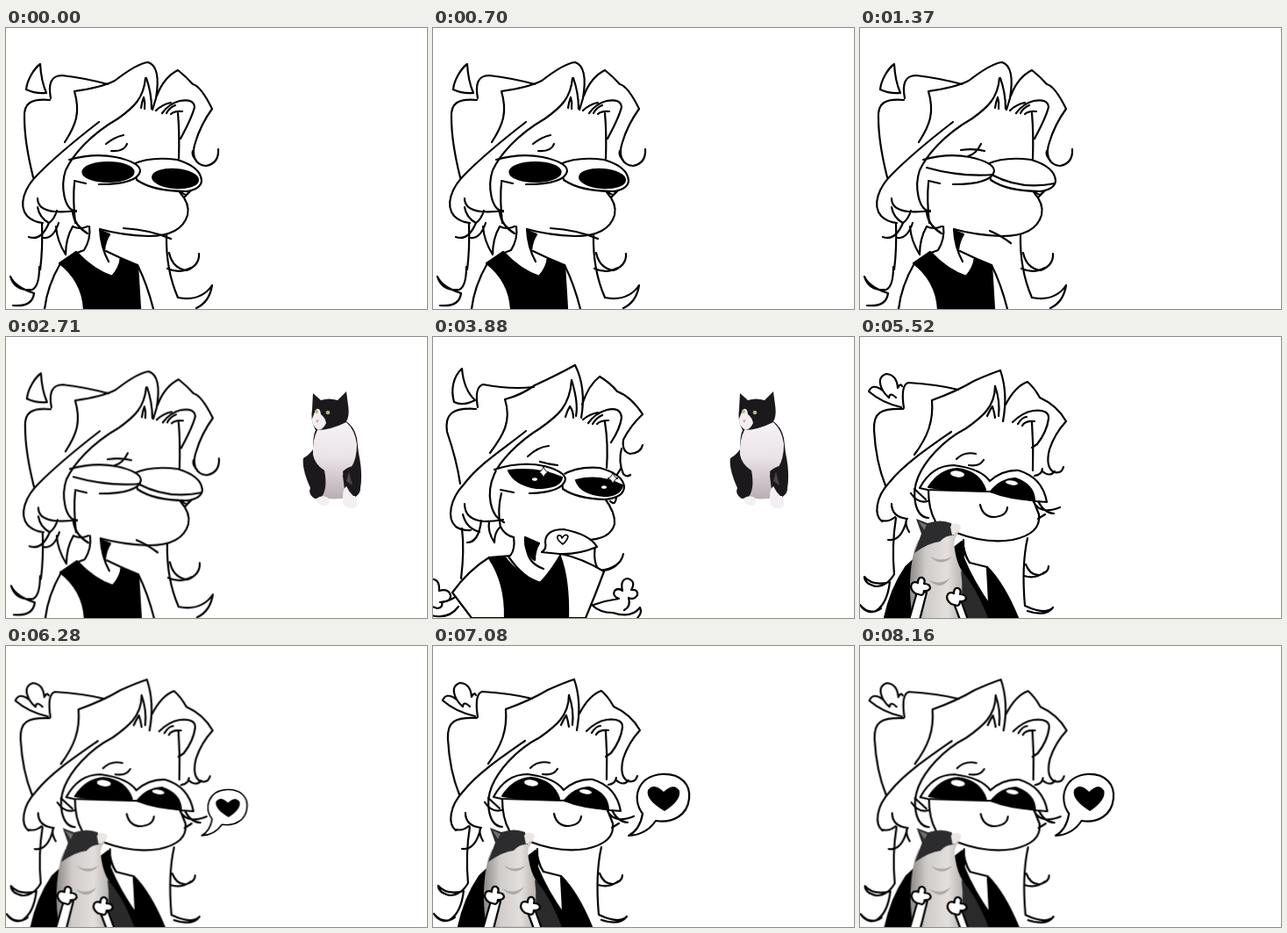
Recreate the animation shown at these times as an HTML page without scripts. Size 480 px wide and 320 px high, loop 8.43 s.

```html
<!DOCTYPE html>
<html lang="en">
<head>
<meta charset="utf-8">
<title>Cat hug</title>
<style>
html, body { margin: 0; width: 100%; height: 100%; overflow: hidden; background: #fff; }
svg { display: block; width: 480px; height: 320px; }
.ink { fill: none; stroke: #000; stroke-width: 2.2; stroke-linecap: round; stroke-linejoin: round; }
.w { fill: #fff; }
.k { fill: #000; }
.shine { fill: #fff; stroke: none; }
.spark { fill: #fff; stroke-width: 1; }
#calm, #want, #hug, .open, .shut, #cat, #bubble, .boil {
  animation: 8430ms step-end infinite;
}
#calm { animation-name: calm; }
#want { animation-name: want; }
#hug { animation-name: hug; }
.open { animation-name: open; }
.shut { animation-name: shut; }
#cat { animation-name: cat; }
#bubble { animation-name: bubble; transform-origin: 223px 216px; }
.boil { animation-name: boil; }

@keyframes calm { 0% { opacity: 1 } 34.52%, 100% { opacity: 0 } }
@keyframes want { 0% { opacity: 0 } 34.52% { opacity: 1 } 65.48%, 100% { opacity: 0 } }
@keyframes hug { 0% { opacity: 0 } 65.48%, 100% { opacity: 1 } }
@keyframes cat { 0% { opacity: 0 } 20.641% { opacity: 1 } 65.48%, 100% { opacity: 0 } }
@keyframes open {
  0% { opacity: 1 } 5.219% { opacity: 0 } 7.592% { opacity: 1 }
  16.251% { opacity: 0 } 18.268% { opacity: 1 } 32.147%, 100% { opacity: 0 }
}
@keyframes shut {
  0% { opacity: 0 } 5.219% { opacity: 1 } 7.592% { opacity: 0 }
  16.251% { opacity: 1 } 18.268% { opacity: 0 } 32.147%, 100% { opacity: 1 }
}
@keyframes bubble {
  0% { opacity: 0; transform: scale(.2) }
  71.174% { opacity: 1; transform: scale(.35) }
  73.31% { opacity: 1; transform: scale(.75) }
  75.445%, 83.986%, 93.594% { opacity: 1; transform: none }
  77.58%, 87.189%, 96.797% { opacity: 1; transform: scale(.955, 1) }
  80.783%, 90.391% { opacity: 1; transform: scale(.955, 1.02) }
  100% { opacity: 1; transform: scale(.955, 1) }
}
/* hand-drawn line wobble */
@keyframes boil {
  0%, 7.592%, 16.251%, 20.641% { transform: none }
  3.203%, 5.219%, 9.846%, 18.268%, 32.147% { transform: translate(.8px, .3px) }
  34.52%, 43.654%, 50.415%, 57.177% { transform: translate(.3px, .9px) }
  39.265%, 46.026%, 52.788%, 59.549% { transform: none }
  65.48%, 71.174%, 75.445% { transform: none }
  69.039%, 73.31%, 77.58%, 87.189%, 96.797%, 100% { transform: translate(.6px, .2px) }
  83.986%, 93.594% { transform: translate(.9px, -.1px) }
}
</style>
</head>
<body>
<svg viewBox="0 0 480 320">
<defs>
  <linearGradient id="fur">
    <stop stop-color="#8d8a88"/><stop offset=".3" stop-color="#cfccc9"/><stop offset=".7" stop-color="#e2dfdc"/><stop offset="1" stop-color="#b5b1ae"/>
  </linearGradient>
  <linearGradient id="bib" x2="0" y2="1">
    <stop stop-color="#f6f2f5"/><stop offset=".45" stop-color="#ebe3e8"/><stop offset="1" stop-color="#b9adb2"/>
  </linearGradient>
  <path id="star" d="M0-7Q1-1 6 0Q1 1 0 7Q-1 1-6 0Q-1-1 0-7Z"/>
  <path id="paw" d="M-6 8Q-13 3-10-3Q-7-6-3-4Q-3-11 2-10Q6-8 4-3Q11-3 11 2Q9 6 4 5Q4 9 1 10Z"/>
</defs>

<g id="cat">
  <path fill="#1b191c" d="M350 64L359 72Q368 69 378 72L388 62L390 77Q392 90 388 96Q397 102 400 115L402 132Q407 155 404 172Q403 181 396 183L352 184Q344 179 347 172Q337 150 339 138Q346 134 350 128Q350 112 353 106Q347 96 349 83Z"/>
  <path fill="url(#bib)" d="M355 106Q370 106 388 97Q398 106 400 122Q400 138 394 148Q385 149 384 158L387 182Q374 187 360 182Q367 172 363 152Q352 145 350 134Q349 118 355 106Z"/>
  <path fill="#f4eef1" d="M353 83Q358 79 359 88Q364 92 365 98Q362 105 356 106Q348 101 349 93Z"/>
  <path fill="#f4eff2" d="M354 184Q360 179 367 183Q371 190 364 192Q355 192 354 184ZM384 182Q384 168 392 170L400 185Q402 193 396 195Q386 196 384 188Z"/>
  <path fill="#1b191c" d="M384 153Q392 146 402 146L404 174Q402 182 396 181Q386 172 384 153Z"/>
  <path fill="#4a4549" d="M391 153L395 169L388 164Z"/>
  <circle cx="354" cy="85" r="2" fill="#b4b57d"/><circle cx="367" cy="86" r="2.3" fill="#b4b57d"/>
  <path fill="#d5a0a2" d="M353 95L357 94L355 98Z"/>
</g>

<g id="calm"><g class="ink boil">
  <path d="M39 41C31 47 24 60 23 70Q33 75 46 74Q40 60 39 41Z"/>
  <path d="M51 80C48 64 51 54 64 54Q90 57 116 64M50 82C28 80 20 86 21 102C21 128 26 150 31 170"/>
  <path d="M67 130C80 110 85 96 78 72Q108 68 124 60Q150 40 162 39C174 43 174 62 171 80L167 93"/>
  <path d="M159 57C157 80 146 90 128 103C95 122 76 145 68 162C62 180 66 207 80 209M106 107C84 124 58 145 38 165C20 182 14 202 24 214Q31 221 42 222"/>
  <path d="M160 57Q166 74 166 92M154 91Q155 84 157 79Q159 85 158 92"/>
  <path d="M172 77Q180 56 196 48Q206 56 213 64Q222 66 235 92Q222 110 216 130C211 144 215 156 228 157Q243 154 242 138"/>
  <path d="M178 97Q186 86 198 83Q214 80 215 90Q212 102 199 126M171 94Q178 87 188 85M183 97Q186 91 193 88M188 98Q192 94 201 95M196 97Q198 120 197 149M217 151Q211 145 213 140"/>
  <path d="M78 176Q76 195 79 222M198 187Q210 200 207 213Q200 237 162 237Q132 236 107 229M200 187Q207 193 208 186M203 193L211 185"/>
  <path d="M36 194Q36 207 55 209Q66 210 80 208M36 204Q38 216 49 222M26 238Q40 243 49 222Q55 218 58 208M43 239Q54 240 60 222M76 210Q78 225 93 234M68 258Q58 242 57 226M68 258Q68 240 76 226Q84 230 93 226"/>
  <path d="M41 222Q42 252 39 275M38 272Q38 294 30 298Q10 300 5 283Q10 295 32 302Q30 318 8 316"/>
  <path d="M183 235Q182 275 196 307Q222 312 235 293Q232 312 217 319M186 256Q190 274 206 276Q221 270 220 257M184 274Q198 280 211 273"/>
  <path d="M95 226Q97 240 89 253L81 256Q100 276 121 283Q130 272 131 262L114 254M107 229Q108 250 117 266M62 268Q47 294 44 320M150 270Q161 292 168 320"/>
  <path class="k" d="M108 231L118 235Q113 242 112 253ZM61 268L80 255Q99 276 121 283Q130 274 131 262L150 270L153 320H89Q87 288 61 268Z"/>
  <path class="w" d="M145 155Q165 146 195 150Q222 158 223 174Q222 184 205 186Q168 186 149 173Z"/>
  <path class="w" stroke="none" d="M78 147Q100 142 125 147Q153 153 153 163Q150 178 106 179L78 175Z"/>
  <path d="M72 150Q100 142 125 147Q153 153 153 163Q150 178 106 178M91 177L78 174"/>
  <g class="open">
    <ellipse class="k" cx="116.500" cy="164" rx="29" ry="11"/>
    <ellipse class="k" cx="193" cy="171.500" rx="26" ry="10.500" transform="rotate(4 193 172)"/>
    <path d="M114 132Q124 124 134 122M120 140Q135 141 138 132M134 228Q165 230 188 240"/>
  </g>
  <g class="shut">
    <path d="M76 159Q115 170 152 167M150 167Q184 185 222 177M115 139Q130 137 142 140M138 132Q132 144 123 146M148 231Q160 236 172 245"/>
  </g>
</g></g>

<g id="want"><g class="ink boil">
  <path d="M33 36C23 45 20 60 24 74Q34 79 48 72Q35 60 33 36Z"/>
  <path d="M51 80Q47 57 57 54Q88 60 115 57M49 82C22 80 13 88 16 108Q27 140 31 167"/>
  <path d="M65 132C80 112 90 96 82 71Q101 66 116 55Q142 43 162 32Q175 58 169 92"/>
  <path d="M158 49C156 79 142 90 122 104C96 120 76 142 70 156C60 178 65 204 81 211M106 107C80 128 53 144 35 168C20 184 15 206 26 216Q34 221 43 220"/>
  <path d="M158 49Q166 75 163 90M151 91Q153 84 156 79Q160 84 160 92"/>
  <path d="M170 77Q177 55 190 45Q203 53 210 62Q226 68 239 88Q225 101 217 117Q215 131 225 133Q237 132 239 123"/>
  <path d="M177 98Q185 87 198 83Q214 79 215 92Q213 105 203 120M171 94Q178 88 188 86M182 99Q186 92 193 89M187 99Q191 95 200 95M196 97Q200 122 198 149M215 127Q211 142 217 156Q221 160 225 157M214 150Q210 157 207 160"/>
  <path d="M78 178Q73 197 77 217M196 184Q208 200 207 213Q202 231 174 231M202 187Q208 193 209 182"/>
  <path d="M36 190Q36 208 58 210Q70 210 80 208M34 202Q38 218 53 222M39 234Q52 234 55 209M70 234Q62 222 64 210M70 234Q70 222 77 216Q82 226 92 228"/>
  <path d="M33 218Q36 243 32 275M185 237Q182 258 190 266Q214 263 217 247M186 265Q200 268 209 260"/>
  <path class="w" d="M92 228Q94 242 88 249L64 251Q40 266 22 291Q32 304 44 320H174Q185 294 195 267Q170 252 146 247Q138 262 123 280Q104 276 86 250"/>
  <path class="k" d="M64 252L82 251Q98 272 122 280Q136 266 145 250Q155 276 154 320H82Q83 280 64 252ZM105 228L121 235Q116 243 116 254Q104 246 105 228Z"/>
  <path d="M107 242Q109 258 126 264"/>
  <path class="w" d="M124 245Q130 241 128 234Q128 219 149 219Q179 225 187 239Q165 248 144 247Z"/>
  <path class="w" d="M148 236Q139 229 143 226Q146 225 147 229Q151 223 154 227Q153 232 148 236Z" stroke-width="1.600"/>
  <path class="w" d="M146 158Q164 147 190 149Q216 156 218 170Q218 183 196 185Q164 184 148 173Z"/>
  <path class="w" stroke="none" d="M72 150Q110 141 150 156Q155 177 106 178L78 174Z"/>
  <path d="M70 151Q100 141 127 147Q150 153 151 162Q148 177 110 178M92 177L77 174"/>
  <path class="k" d="M86 152Q120 148 147 160Q145 172 118 172Q93 168 86 152ZM163 163Q190 156 216 169Q213 181 195 181Q168 179 163 163Z"/>
  <ellipse class="shine" cx="116" cy="162" rx="3" ry="1.800"/><ellipse class="shine" cx="195" cy="171" rx="3" ry="1.800"/>
  <use href="#star" class="spark" x="126" y="154"/><use href="#star" class="spark" x="205" y="161"/>
  <path d="M108 136Q120 125 132 124M122 142Q132 145 142 146" />
  <path class="w" d="M-4 276Q8 274 7 289Q18 286 20 294Q21 301 10 302Q12 308 5 309L-4 306"/>
  <path d="M8 302Q15 302 24 297M-2 317Q18 322 29 307"/>
  <path class="w" d="M183 305Q197 300 212 298Q204 295 207 289Q211 285 216 289Q213 276 222 275Q232 278 226 288Q234 287 233 294Q229 300 223 297Q226 307 218 311"/>
  <path d="M181 305Q190 314 205 314Q226 321 236 308Q239 314 233 320"/>
</g></g>

<g id="hug"><g class="ink boil">
  <path d="M47 80Q25 75 10 62Q14 52 26 61Q18 46 30 42Q42 43 43 58M26 61Q29 66 33 69M33 69Q34 62 41 69M43 58Q46 52 48 56"/>
  <path d="M50 81Q46 55 55 52Q88 54 112 60M49 82C24 81 15 86 16 106Q18 142 29 169"/>
  <path d="M62 134C77 114 84 96 82 72Q110 62 130 50Q148 42 160 38Q169 64 163 96"/>
  <path d="M154 56C154 80 138 92 121 104C92 119 73 143 66 160C58 180 63 205 78 206M104 108C78 126 50 145 34 165C17 183 16 203 25 210"/>
  <path d="M154 56Q160 73 158 90M145 90Q148 83 151 79Q153 85 154 92M166 77Q177 56 191 51Q199 58 205 69Q225 78 235 96Q222 110 216 128Q211 148 221 154Q230 156 232 148"/>
  <path d="M174 97Q185 86 197 84Q216 82 215 93Q213 108 202 122L196 126M180 99Q185 91 190 91M185 101Q188 95 199 96M196 97Q198 125 197 152M199 158Q207 157 208 150M208 153Q216 160 222 153"/>
  <path d="M78 174Q78 196 86 210M110 223Q144 236 174 231Q207 224 204 202L198 187M62 173L75 185M58 178Q66 190 77 187M198 188Q206 203 228 194M202 184Q208 200 221 201M203 207L211 202"/>
  <path d="M36 190Q36 205 54 207M25 209Q33 211 40 205M32 231Q47 233 53 209M56 222Q51 214 53 207"/>
  <path d="M41 206Q36 237 39 270Q31 284 18 284Q5 281 5 273Q14 284 34 279Q31 304 18 312Q8 315 0 305Q9 319 24 309"/>
  <path d="M191 229Q184 260 188 306Q211 317 220 308Q212 319 191 312M189 259Q194 272 205 271Q215 268 215 261M187 272Q200 276 210 268"/>
  <path class="k" d="M65 250L52 262Q35 287 28 320H149L145 291Q125 268 116 233L107 240Z"/>
  <path class="w" d="M118 231Q117 246 125 257L145 262Q148 285 149 307Q129 279 118 252Z"/>
  <path class="k" d="M145 262Q164 281 180 320H148Z"/>
  <path class="w" d="M68 172Q82 146 107 146Q138 150 148 164Q163 151 181 152Q208 160 213 188L200 187L148 176L144 176L77 174Z"/>
  <path class="k" d="M78 171Q91 151 111 150Q136 153 143 174Q115 177 78 171ZM149 176Q160 162 177 161Q198 168 199 186Q168 184 149 176Z"/>
  <ellipse class="shine" cx="111" cy="156" rx="8" ry="3.500" transform="rotate(8 111 156)"/>
  <ellipse class="shine" cx="173" cy="166" rx="7" ry="2.500" transform="rotate(8 173 166)"/>
  <path d="M110 139Q119 130 132 133M124 146Q136 148 141 140M137 191Q140 205 153 205Q167 204 168 194"/>
  <g stroke="none">
    <path fill="url(#fur)" d="M66 232Q86 222 102 213L112 214Q115 220 110 226Q106 232 108 242Q110 257 117 268Q119 287 116 320H60Q53 279 62 242Z"/>
    <path fill="#2c2b2d" d="M64 207L77 212Q92 207 104 212Q104 221 107 226Q98 225 91 233Q79 234 62 246L70 224Z"/>
    <path fill="#77716f" d="M67 210L76 214L73 220Z"/>
    <path fill="#ebe6e4" d="M103 216Q107 210 114 214Q117 220 109 223L105 226Z"/>
    <path fill="#2b2a2b" d="M115 266Q131 282 146 320H112Q119 292 115 266Z"/>
    <path fill="#aaa7a4" d="M80 250Q92 257 105 250Q93 263 80 250ZM78 276Q91 284 103 274Q92 291 78 276Z"/>
  </g>
  <path class="w" d="M66 287L56 322H68L76 291ZM105 298L114 322H123L114 297Z"/>
  <use href="#paw" class="w" x="69" y="284"/>
  <use href="#paw" class="w" x="110" y="296"/>
</g></g>

<g id="bubble" class="ink">
  <path class="w" d="M239 191C226 174 233 148 261 146C283 145 294 158 292 174C290 193 273 202 254 199Q243 215 223 216Q236 209 239 191Z"/>
  <path class="k" stroke="none" d="M264 188Q242 175 245 164Q252 155 263 166Q275 155 281 165Q283 176 264 188Z"/>
</g>
</svg>
</body>
</html>
```
